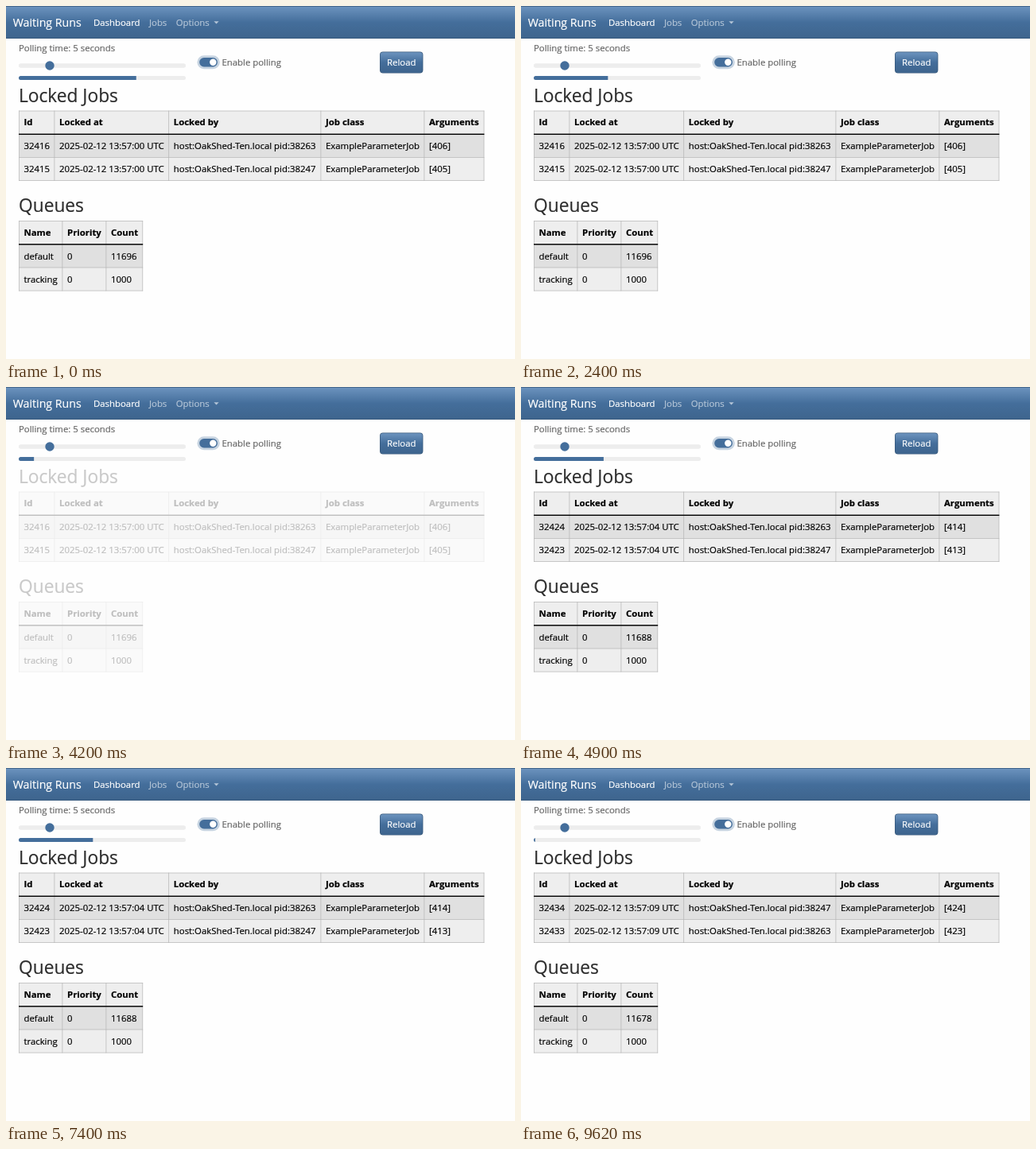
Animation, 640 px wide and 444 px high, one loop 9730 ms. Source, as an HTML page with a canvas:

```html
<!DOCTYPE html>
<html lang="en">
<head>
<meta charset="utf-8">
<title>Job dashboard</title>
<style>
  html, body { margin: 0; width: 100%; height: 100%; overflow: hidden; background: #fefefe; }
  canvas { display: block; width: 640px; height: 444px; }
</style>
</head>
<body>
<canvas id="stage" width="640" height="444"></canvas>
<script>
const ctx = document.getElementById('stage').getContext('2d');
const LOOP = 9730, PERIOD = 5000;
const PAGE = '#fefefe', BLUE = '#446e9b', TRACK = '#ededed';
const REM = 11.36, HAIR = 0.71;
const FAMILY = '"Open Sans", "Noto Sans", sans-serif';

// A faint outline gives the text its slightly heavy smoothing
function text(str, x, y, color = '#000', size = REM, weight = 400, align = 'left') {
  ctx.font = `${weight} ${size}px ${FAMILY}`;
  ctx.textAlign = align;
  ctx.fillStyle = ctx.strokeStyle = color;
  ctx.lineWidth = 0.2;
  ctx.lineJoin = 'round';
  ctx.fillText(str, x, y);
  ctx.strokeText(str, x, y);
}

function rect(x, y, w, h, color) {
  ctx.fillStyle = color;
  ctx.fillRect(x, y, w, h);
}

function pill(x, y, w, h, color, radius = h / 2) {
  ctx.beginPath();
  ctx.roundRect(x, y, w, h, radius);
  ctx.fillStyle = color;
  ctx.fill();
}

function disc(x, y, r, color) {
  pill(x - r, y - r, 2 * r, 2 * r, color);
}

function gloss(top, bottom) {
  const g = ctx.createLinearGradient(0, top, 0, bottom);
  g.addColorStop(0, '#6d94bf');
  g.addColorStop(0.5, BLUE);
  g.addColorStop(1, '#3e648d');
  return g;
}

// CSS "ease": cubic-bezier(.25, .1, .25, 1), solved by bisection
function ease(x) {
  if (x <= 0) return 0;
  if (x >= 1) return 1;
  const bezier = (a, b, s) => 3 * a * s * (1 - s) ** 2 + 3 * b * s * s * (1 - s) + s ** 3;
  let lo = 0, hi = 1;
  for (let i = 0; i < 24; i++) {
    const mid = (lo + hi) / 2;
    if (bezier(0.25, 0.25, mid) < x) lo = mid; else hi = mid;
  }
  return bezier(0.1, 1, lo);
}

// Right edge of the countdown bar: a linear drain with an eased refill
function barEnd(t) {
  const REFILL_LEAD = 234, REFILL = 500;
  let u = t % PERIOD;
  if (u > PERIOD - REFILL_LEAD) u -= PERIOD;
  const drained = Math.max(16, 208.2 - 0.0412 * u);
  return 16 + (drained - 16) * ease((u + REFILL_LEAD) / REFILL);
}

function drawNav() {
  rect(0, 0, 640, 41, gloss(0, 41));
  rect(0, 0, 640, HAIR, '#345578');
  rect(0, 41 - HAIR, 640, HAIR, '#345578');
  text('Waiting Runs', 8.7, 25.6, '#fff', 1.25 * REM);
  text('Dashboard', 110, 24.7, '#fff');
  const muted = '#b4c5d7';
  text('Jobs', 180, 24.7, muted);
  text('Options', 213.7, 24.7, muted);
  ctx.beginPath();
  ctx.moveTo(261.4, 19.2);
  ctx.lineTo(267.6, 19.2);
  ctx.lineTo(264.5, 22.4);
  ctx.fill();
}

function drawControls(t) {
  text('Polling time: 5 seconds', 16, 56.8, '#666');
  pill(16, 72.3, 210, 5.4, TRACK);
  disc(55, 75, 5.7, BLUE);

  ctx.save();
  ctx.beginPath();
  ctx.roundRect(16, 88, 210, 5, 2.5);
  ctx.clip();
  rect(16, 87, 210, 7, TRACK);
  rect(16, 87, barEnd(t) - 16, 7, BLUE);
  ctx.restore();

  pill(240.4, 62.2, 28.4, 17, '#c7d4e1');
  pill(243.2, 65, 22.7, 11.4, BLUE);
  disc(260.3, 70.7, 4.2, '#fff');
  text('Enable polling', 271.5, 74.8, '#666');

  pill(470, 57.5, 54.4, 27.1, '#345578', 4);
  pill(470 + HAIR, 57.5 + HAIR, 54.4 - 2 * HAIR, 27.1 - 2 * HAIR, gloss(58, 84), 3.3);
  text('Reload', 497.2, 75.2, '#fff', REM, 400, 'center');
}

// Edges are the centres of the vertical rules; cells start just after each
function drawTable(edges, top, rows) {
  const left = edges[0], width = edges[edges.length - 1] - left;
  const lines = [0, 29.3, 58.5, 87.6].map(dy => top + dy);
  const border = '#b4b4b4', half = HAIR / 2;
  ['#eeeeee', '#e0e0e0', '#eeeeee'].forEach((fill, i) =>
    rect(left, lines[i], width, lines[i + 1] - lines[i], fill));
  lines.forEach(y => rect(left - half, y - half, width + HAIR, HAIR, border));
  edges.forEach(x => rect(x - half, top - half, HAIR, lines[3] - top + HAIR, border));
  rect(left - half, lines[1] - HAIR, width + HAIR, 2 * HAIR, '#000');
  const baselines = [18.2, 48.1, 77.1];
  rows.forEach((cells, r) => cells.forEach((cell, c) =>
    text(cell, edges[c] + 6.1, top + baselines[r], '#000', REM, r ? 400 : 700)));
}

function drawData(job, second, pids) {
  const lockedRow = (n, pid) => [
    String(32010 + n), `2025-02-12 13:57:${second} UTC`,
    `host:OakShed-Ten.local pid:${pid}`, 'ExampleParameterJob', `[${n}]`
  ];
  text('Locked Jobs', 16, 120.7, '#2d2d2d', 2 * REM);
  drawTable([16.4, 60.9, 204.7, 395.9, 525.9, 601], 132, [
    ['Id', 'Locked at', 'Locked by', 'Job class', 'Arguments'],
    lockedRow(job, pids[0]),
    lockedRow(job - 1, pids[1])
  ]);
  text('Queues', 16, 259.1, '#2d2d2d', 2 * REM);
  drawTable([16.4, 70.9, 125.9, 171.8], 270.5, [
    ['Name', 'Priority', 'Count'],
    ['default', '0', String(12102 - job)],
    ['tracking', '0', '1000']
  ]);
}

const LOADS = [
  { at: 0, job: 406, second: '00', pids: [38263, 38247] },
  { at: 4400, job: 414, second: '04', pids: [38263, 38247] },
  { at: 9400, job: 424, second: '09', pids: [38247, 38263] }
];

function draw(t) {
  rect(0, 0, 640, 444, PAGE);
  drawNav();
  const load = LOADS.filter(l => l.at <= t).pop();
  drawData(load.job, load.second, load.pids);
  const fetching = LOADS.some(l => t >= l.at - 200 && t < l.at);
  if (fetching) {
    ctx.globalAlpha = 0.75;
    rect(0, 95, 640, 349, PAGE);
    ctx.globalAlpha = 1;
  }
  drawControls(t);
}

// The picture updates ten times a second, with one longer last step
function step(t) {
  return t >= 9620 ? 9620 : Math.min(9500, Math.floor(t / 100) * 100);
}

const start = performance.now();
function tick() {
  draw(step((performance.now() - start) % LOOP));
  requestAnimationFrame(tick);
}
tick();
</script>
</body>
</html>
```
